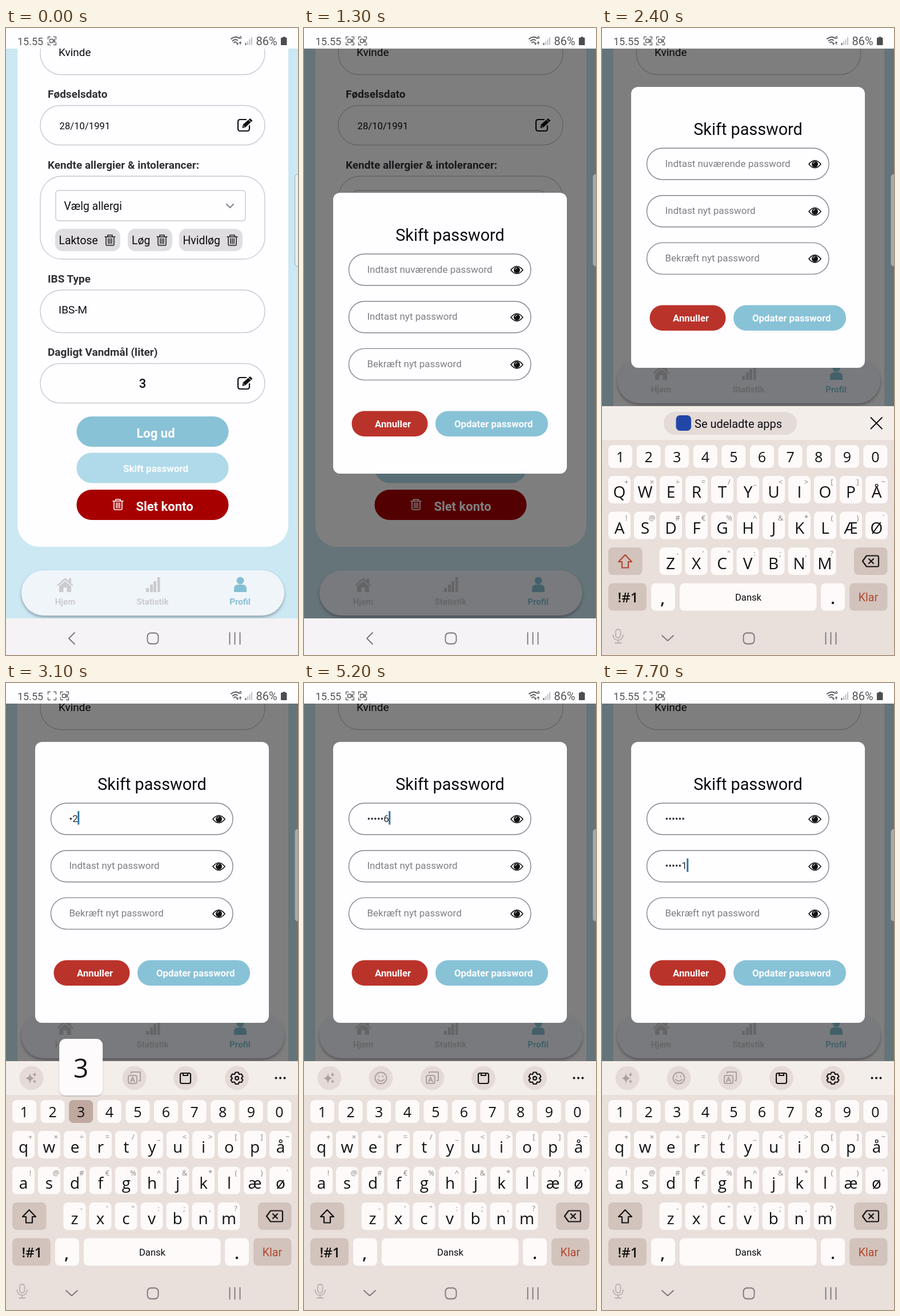
Animation, 511 px wide and 1096 px high, one loop 8000 ms. Source, as an HTML page:

```html
<!DOCTYPE html>
<html lang="da">
<head>
<meta charset="utf-8">
<title>Skift password</title>
<style>
html, body { margin: 0; width: 100%; height: 100%; overflow: hidden; background: #fefdff; }
svg { display: block; width: 100%; height: 100%; }
text { font-family: Roboto, sans-serif; font-size: 19px; fill: #0c0c10; }
.bold { font-weight: 700; fill: #303036; }
.white { font-weight: 700; fill: #fefdff; }
.mid { text-anchor: middle; }
.key, .bubble { font-family: "Open Sans", "Noto Sans", sans-serif; text-anchor: middle; fill: #111; }
.hint { font-family: "Open Sans", "Noto Sans", sans-serif; font-size: 13px; text-anchor: middle; fill: #8b8380; }
.line { fill: none; stroke-linecap: round; stroke-linejoin: round; }
.box { fill: none; stroke: #c8c8cf; stroke-width: 1.4; }
.field { fill: #fefdff; stroke: #858388; stroke-width: 1.4; }

.loop { animation: 8s step-end infinite; }
.second { animation-name: second; }
.first { animation-name: first; }
.blink { animation: blink 1s step-end infinite; }
.press { animation-name: press; }
.overlay { animation-name: overlay; }
.modal { animation-name: modal; }
.tabs { animation-name: tabs; }
.resized { animation-name: resized; }
.keyboard { animation-name: keyboard; }
.back { animation-name: back; }
.down { animation-name: down; }
.suggest { animation-name: suggest; }
.tools { animation-name: tools; }
@keyframes second { 0% { transform: translateX(-22px); } 2.5%, 100% { transform: none; } }
@keyframes first { 0% { opacity: 0; } 2.5%, 100% { opacity: 1; } }
@keyframes blink { 0%, 70%, 100% { opacity: 0; } 20% { opacity: 1; } }
@keyframes press { 0% { opacity: 1; } 11.25% { opacity: .5; } 12.5% { opacity: .35; } 13.75% { opacity: .8; } 15%, 100% { opacity: 1; } }
@keyframes overlay { 0% { opacity: 0; } 13.75% { opacity: .07; } 15% { opacity: .55; } 16.25%, 100% { opacity: 1; } }
@keyframes modal { 0% { transform: translateY(185px); } 25%, 100% { transform: none; } }
@keyframes tabs { 0% { transform: none; } 23.75%, 100% { transform: translateY(-371px); } }
@keyframes resized { 0% { opacity: 0; } 23.75%, 100% { opacity: 1; } }
@keyframes keyboard {
  0% { transform: translateY(435px); } 23.75% { transform: translateY(401px); }
  25% { transform: translateY(190px); } 26.25% { transform: translateY(70px); }
  27.5% { transform: translateY(18px); } 28.75%, 100% { transform: none; }
}
@keyframes back { 0% { opacity: 1; } 25%, 100% { opacity: 0; } }
@keyframes down { 0% { opacity: 0; } 25%, 100% { opacity: 1; } }
@keyframes suggest { 0% { opacity: 1; } 32.5%, 100% { opacity: 0; } }
@keyframes tools { 0% { opacity: 0; } 32.5%, 100% { opacity: 1; } }
</style>
</head>
<body>
<svg viewBox="0 0 511 1096">
  <defs>
    <filter id="soft" x="-20%" y="-20%" width="140%" height="150%">
      <feDropShadow dx="0" dy="3" stdDeviation="2.5" flood-color="#445" flood-opacity=".45"/>
    </filter>
    <filter id="faint" x="-20%" y="-20%" width="140%" height="140%">
      <feDropShadow dx="0" dy="1" stdDeviation="1.2" flood-color="#433" flood-opacity=".35"/>
    </filter>
    <g id="edit" class="line" stroke="#111" stroke-width="2.2">
      <path d="M15 3H5Q1 3 1 7V19Q1 23 5 23H17Q21 23 21 19V14"/>
      <path d="M9 17L10 12L22 1.5L26 5L14 16Z" fill="#111" stroke-width="1"/>
      <path d="M19.5 3.5L24 7.5M10 13.5L12.500 16" stroke="#fefdff" stroke-width="1"/>
    </g>
    <g id="bin" class="line" stroke-width="1.6">
      <path d="M-9 -6H9M-4 -6V-9H4V-6M-7 -6V7Q-7 9 -5 9H5Q7 9 7 7V-6M-3 -3V6M0 -3V6M3 -3V6"/>
    </g>
    <g id="eye">
      <path d="M-10.500 0Q0 -13 10.500 0Q0 13 -10.500 0Z" fill="#fefdff" stroke="#111" stroke-width="1.6"/>
      <circle r="5.500" fill="#111"/><path d="M-3 -1Q-2.500 -3 0 -3.500" class="line" stroke="#fefdff"/>
    </g>
    <path id="corners" class="line" stroke="#666" stroke-width="1.4" d="M-7 -3V-7H-3M3 -7H7V-3M7 3V7H3M-3 7H-7V3"/>
    <g id="camera" class="line" stroke="#555" stroke-width="1.4">
      <rect x="-4" y="-3" width="6" height="6" rx="1.500"/><path d="M2 -.5L5 -2.500V2.500L2 .5"/>
    </g>
  </defs>

  <rect width="511" height="1096" fill="#cbe8f3"/>
  <rect x="20" y="-60" width="474" height="967" rx="38" fill="#fefdff"/>
  <g class="box">
    <rect x="60" y="7" width="393" height="74.500" rx="37"/>
    <rect x="60" y="135.500" width="393" height="69" rx="34.500"/>
    <rect x="60" y="259" width="393" height="145" rx="38"/>
    <rect x="87" y="284" width="332" height="53" rx="5"/>
    <rect x="60" y="458" width="393" height="74.500" rx="37"/>
    <rect x="60" y="586.500" width="393" height="69" rx="34.500"/>
  </g>
  <text x="92" y="48.500">Kvinde</text>
  <text x="73" y="122" class="bold">Fødselsdato</text>
  <text x="93.500" y="177" style="font-size:16.7px">28/10/1991</text>
  <text x="73" y="245.500" class="bold">Kendte allergier &amp; intolerancer:</text>
  <text x="101.500" y="318" style="font-size:19.4px">Vælg allergi</text>
  <path d="M386 308L392 314L398 308" class="line" stroke="#85858a" stroke-width="2.2"/>
  <g fill="#dfdddf">
    <rect x="86" y="351" width="114" height="39" rx="13"/>
    <rect x="213" y="351" width="78" height="39" rx="13"/>
    <rect x="303" y="351" width="111" height="39" rx="13"/>
  </g>
  <g style="font-size:19.4px">
    <text x="92.500" y="378" style="font-size:inherit">Laktose</text>
    <text x="220" y="378" style="font-size:inherit">Løg</text>
    <text x="309.500" y="378" style="font-size:inherit">Hvidløg</text>
  </g>
  <g stroke="#222">
    <use href="#bin" x="182" y="371"/><use href="#bin" x="273" y="371"/><use href="#bin" x="396" y="371"/>
  </g>
  <text x="73" y="444.500" class="bold">IBS Type</text>
  <text x="92" y="499">IBS-M</text>
  <text x="73" y="572.500" class="bold">Dagligt Vandmål (liter)</text>
  <text x="239" y="629" class="mid" style="font-size:22px;font-weight:500">3</text>
  <use href="#edit" x="405" y="157"/><use href="#edit" x="405" y="608"/>
  <rect x="123.500" y="679" width="266" height="53" rx="26.500" fill="#88c2d7"/>
  <text x="262" y="715.500" class="white mid" style="font-size:22px">Log ud</text>
  <g class="loop press">
    <rect x="123.500" y="742.500" width="266" height="53" rx="26.500" fill="#b0dae9"/>
    <text x="262" y="776" class="white mid" style="font-size:17px">Skift password</text>
  </g>
  <rect x="123.500" y="807" width="266" height="53" rx="26.500" fill="#a70000"/>
  <text x="277.500" y="843.500" class="white mid" style="font-size:22px">Slet konto</text>
  <use href="#bin" x="196" y="833" stroke="#fefdff"/>

  <g class="loop tabs">
    <rect x="27" y="948" width="460" height="79" rx="39.500" fill="#f0f5fa" filter="url(#soft)"/>
    <g fill="#cbcbd0">
      <path d="M89 974L103.500 961L110 966.500V962H114V970.500L118 974L116 975.500L103.500 965L91 975.500Z"/>
      <path d="M93 975.500L103.500 967L114 975.500V986H106.500V978H100.500V986H93Z"/>
      <path d="M245 979H250V986H245ZM252 973H257V986H252ZM258 967H263V986H258ZM265 960H269.500V986H265Z"/>
    </g>
    <g fill="#86c0d4">
      <circle cx="410" cy="966" r="6.500"/>
      <path d="M399 986V981Q399 973 406 973H414Q421 973 421 981V986Z"/>
    </g>
    <g class="mid bold" style="font-size:15px">
      <text x="103.500" y="1008" style="font-size:inherit;fill:#cbcbd0">Hjem</text>
      <text x="256.500" y="1008" style="font-size:inherit;fill:#cbcbd0">Statistik</text>
      <text x="409.500" y="1008" style="font-size:inherit;fill:#86c0d4">Profil</text>
    </g>
  </g>

  <g class="loop overlay">
    <rect y="36" width="511" height="996" opacity=".5"/>
    <g class="loop modal">
      <rect x="51" y="103" width="409" height="491" rx="12" fill="#fefdff"/>
      <text x="255.500" y="187" class="mid" style="font-size:28.800px">Skift password</text>
      <g id="fields"></g>
      <rect id="cursor" width="3" height="23.500" fill="#2f76a6"/>
      <rect x="83.500" y="484.500" width="133" height="44.500" rx="22" fill="#ba332b"/>
      <text x="124" y="513" class="white" style="font-size:16.800px">Annuller</text>
      <rect x="230" y="484.500" width="197" height="44.500" rx="22" fill="#88c2d7"/>
      <text x="263" y="513" class="white" style="font-size:16.800px">Opdater password</text>
    </g>
  </g>

  <rect class="loop resized" y="661" width="511" height="371" fill="#fefdff"/>
  <rect y="1032" width="511" height="64" fill="#f5f3f6"/>

  <g class="loop keyboard">
    <rect y="661" width="511" height="435" fill="#e9dfdb"/>
    <rect y="661" width="511" height="59" fill="#f4eeea"/>
    <g class="loop suggest">
      <rect x="108" y="671" width="233" height="40" rx="20" fill="#e4dad6"/>
      <rect x="129.500" y="677" width="26.500" height="27" rx="7" fill="#2146a8"/>
      <text x="162" y="698.500" style="font-size:20px">Se udeladte apps</text>
      <path d="M470.500 681L490 700.500M490 681L470.500 700.500" class="line" stroke="#111" stroke-width="2"/>
    </g>
    <g class="loop tools">
      <g fill="#e5dad6">
        <circle cx="44.500" cy="690.500" r="21"/><circle cx="134.500" cy="690.500" r="21"/><circle cx="224.500" cy="690.500" r="21"/>
        <circle cx="314" cy="690.500" r="21"/><circle cx="404" cy="690.500" r="21"/>
      </g>
      <path fill="#aaa19e" d="M42 682Q43 690 50 691Q43 692 42 700Q41 692 34 691Q41 690 42 682ZM50 680Q50.500 684 54 684.500Q50.500 685 50 689Q49.500 685 46 684.500Q49.500 684 50 680ZM50 693Q50.500 696 53 696.500Q50.500 697 50 700Q49.500 697 47 696.500Q49.500 696 50 693Z"/>
      <g class="line" stroke="#aaa19e" stroke-width="2">
        <circle cx="134.500" cy="690.500" r="10"/><path d="M129 693Q134.500 699 140 693M131 687V688M138 687V688"/>
        <rect x="214" y="686" width="15" height="14" rx="3"/><path d="M219 682V680H235V695H233M218 697L221.500 689L225 697M219.500 694.500H223.500"/>
      </g>
      <g class="line" stroke="#151515" stroke-width="2.2">
        <rect x="305" y="682" width="18" height="18" rx="3"/><path d="M310 682V686H318V682Z"/>
        <path d="M401.500 680.500H406.500L408 684L412 683.500L414.500 688L412 691L414.500 694L412 698L408 697.500L406.500 701H401.500L400 697.500L396 698L393.500 694L396 691L393.500 688L396 683.500L400 684Z"/>
        <circle cx="404" cy="690.800" r="3"/>
      </g>
      <path d="M472.500 690.500H472.600M480 690.500H480.100M487.500 690.500H487.600" class="line" stroke="#151515" stroke-width="4"/>
    </g>
    <g id="keys"></g>
    <g fill="#d2c3bc">
      <rect x="11" y="908" width="59.500" height="48" rx="8"/><rect x="441" y="908" width="58.500" height="48" rx="8"/>
      <rect x="11" y="970.500" width="67" height="48" rx="8"/><rect x="433" y="970.500" width="66.500" height="48" rx="8"/>
    </g>
    <g fill="#fdfaf9">
      <rect x="86" y="970.500" width="42" height="48" rx="8"/><rect x="136" y="970.500" width="239.500" height="48" rx="8"/>
      <rect x="383" y="970.500" width="42" height="48" rx="8"/>
    </g>
    <path id="shift" d="M40.500 921L52 933H46V943.500H35V933H29Z" class="line" stroke-width="2.2"/>
    <path d="M463 922.500H482Q484 922.500 484 925V939Q484 941.500 482 941.500H463L456 932ZM467 928L475 936M475 928L467 936" class="line" stroke="#151515" stroke-width="2.2"/>
    <text x="45.500" y="1004" class="key" style="font-size:24px;font-weight:600">!#1</text>
    <text x="106" y="1007" class="key" style="font-size:29px;font-weight:600">,</text>
    <text x="404" y="1007" class="key" style="font-size:29px;font-weight:600">.</text>
    <text x="256" y="1001" class="mid" style="font-size:16.600px">Dansk</text>
    <text x="466" y="1002" class="mid" style="font-size:19.600px;fill:#b0472e">Klar</text>
  </g>

  <g class="line" stroke="#77757a" stroke-width="1.800">
    <path class="loop back" d="M120 1057L110 1067L120 1077"/>
    <path class="loop down" d="M105 1062L115 1071L125 1062"/>
    <rect x="247.500" y="1057.500" width="19" height="19" rx="6"/>
    <path d="M391.500 1057V1077M400.500 1057V1077M409.500 1057V1077"/>
    <g class="loop resized" stroke="#b9b1b0">
      <rect x="24" y="1051" width="8.500" height="15" rx="4.200"/><path d="M19.500 1061Q20 1070 28.200 1070Q36.500 1070 37 1061M28.200 1070V1075M23 1075H33.500"/>
    </g>
  </g>

  <g id="popup">
    <rect x="-38" y="622" width="76" height="99" rx="11" fill="#fdfbfb" filter="url(#faint)"/>
    <text id="popupDigit" class="bubble" y="690" style="font-size:46px"></text>
  </g>

  <rect x="505.500" y="255.500" width="14" height="161" rx="5" fill="#fff" fill-opacity=".4" stroke="#7f8f98" stroke-opacity=".7"/>

  <rect width="511" height="36" fill="#fefdff"/>
  <text x="20" y="29.500" style="font-size:18px;fill:#555">15.55</text>
  <g class="loop first">
    <use href="#corners" x="80.500" y="22.500"/>
    <g class="blink"><use href="#camera" x="80.500" y="22.500"/></g>
  </g>
  <g class="loop second"><use href="#corners" x="102.500" y="22.500"/><use href="#camera" x="102.500" y="22.500"/></g>
  <g class="line" stroke="#555" stroke-width="1.800">
    <path d="M394 19Q401 13 408 18M396.500 22.500Q401 18.500 405 21.500M399 25.500Q401 23.500 403 25"/>
    <path d="M405 29V25M403.500 27L405 29L406.500 27M410 24V29M408.500 26L410 24L411.500 26" stroke-width="1.200"/>
  </g>
  <text x="408" y="18.500" style="font-size:8px;fill:#555;font-weight:700">6</text>
  <path d="M419.500 29V27" class="line" stroke="#555" stroke-width="2"/>
  <path d="M423 29V24M426.500 29V20.500M430 29V17" class="line" stroke="#c0c0c3" stroke-width="2"/>
  <text x="437.500" y="29.500" style="font-size:20px;fill:#555">86%</text>
  <path d="M484 15.500H489V17H491.500V30H481V17H484Z" fill="#4d4d50"/>
</svg>
<script>
const LOOP = 8000, KEY_HOLD = 100, MASK_DELAY = 1500, FOCUS = [1900, 5500];
const TEXT_X = 110.5, KEY_FILL = '#fdfaf9';
const $ = id => document.getElementById(id);

function add(parent, tag, attrs, content = '') {
  const el = document.createElementNS('http://www.w3.org/2000/svg', tag);
  for (const name in attrs) el.setAttribute(name, attrs[name]);
  el.textContent = content;
  parent.append(el);
  return el;
}

const fields = ['Indtast nuværende password', 'Indtast nyt password', 'Bekræft nyt password']
  .map((placeholder, i) => {
    const y = 210 + i * 82.7;
    add($('fields'), 'rect', { class: 'field', x: 78.5, y, width: 318.5, height: 55, rx: 27.5 });
    add($('fields'), 'use', { href: '#eye', x: 372.5, y: y + 28 });
    const label = add($('fields'), 'text', { x: TEXT_X, y: y + 32.5, style: 'font-size:17px' });
    return { placeholder, y, label };
  });

const rows = [
  { keys: '1234567890', x: 32, step: 49.6, y: 729, w: 42, h: 40, size: 25, base: 30 },
  { keys: 'qwertyuiopå', hints: '+×÷=/_<>[]~', y: 783 },
  { keys: 'asdfghjklæø', hints: '!@#€%^&*()`', y: 845.5 },
  { keys: 'zxcvbnm', hints: '-\'":;,?', x: 120, y: 908 },
];
const letters = [], digits = {};
for (const row of rows) {
  const { keys, hints, x = 30.5, step = 45, y, w = 39, h = 48, size = 28, base = 38 } = row;
  [...keys].forEach((char, i) => {
    const cx = x + i * step;
    const cap = add($('keys'), 'rect', { x: cx - w / 2, y, width: w, height: h, rx: 8, fill: KEY_FILL });
    const label = add($('keys'), 'text', { class: 'key', x: cx, y: y + base, style: `font-size:${size}px` }, char);
    if (!hints) { digits[char] = { cx, cap }; return; }
    add($('keys'), 'text', { class: 'hint', x: cx + 12, y: y + 15 }, hints[i]);
    letters.push({ char, label });
  });
}

// A quiet stroke types its digit without a key bubble.
const stroke = field => ([time, digit, quiet]) => ({ field, time, digit, quiet, typed: time + KEY_HOLD });
const strokes = [
  ...[[2600, '1'], [2800, '2'], [3100, '3'], [3400, '4'], [3700, '5'], [4000, '6']].map(stroke(0)),
  ...[[6300, '6'], [6600, '5'], [6800, '4'], [7100, '3'], [7300, '2', true], [7600, '1']].map(stroke(1)),
];

function drawFields(t) {
  const focus = t < FOCUS[1] ? 0 : 1;
  fields.forEach(({ label, placeholder }, i) => {
    const typed = strokes.filter(s => s.field === i && s.typed <= t);
    const value = typed.map((s, n) =>
      i === focus && n === typed.length - 1 && t - s.typed < MASK_DELAY ? s.digit : '•').join('');
    label.textContent = value || placeholder;
    label.style.fill = value ? '#2c2c30' : '#7f7d82';
    if (i !== focus) return;
    const edit = Math.max(FOCUS[i], ...typed.map(s => s.typed));
    const on = t >= FOCUS[0] && (t - edit) % 1000 < 500;
    $('cursor').setAttribute('opacity', on ? 1 : 0);
    $('cursor').setAttribute('x', TEXT_X + (value ? label.getComputedTextLength() - 0.5 : 0));
    $('cursor').setAttribute('y', fields[i].y + 14);
  });
}

function drawKeys(t) {
  const upper = t < strokes[0].typed || (t >= FOCUS[1] && t < strokes[6].typed);
  for (const { char, label } of letters) label.textContent = upper ? char.toUpperCase() : char;
  $('shift').setAttribute('stroke', upper ? '#b0472e' : '#151515');

  const down = strokes.find(s => !s.quiet && t >= s.time && t < s.typed);
  for (const d in digits) digits[d].cap.setAttribute('fill', down && down.digit === d ? '#bfa89f' : KEY_FILL);
  $('popup').setAttribute('opacity', down ? 1 : 0);
  if (down) {
    $('popup').setAttribute('transform', `translate(${Math.max(50, digits[down.digit].cx)} 0)`);
    $('popupDigit').textContent = down.digit;
  }
}

let start;
function frame(now) {
  start ??= now;
  const t = (now - start) % LOOP;
  drawFields(t);
  drawKeys(t);
  requestAnimationFrame(frame);
}
requestAnimationFrame(frame);
</script>
</body>
</html>
```
